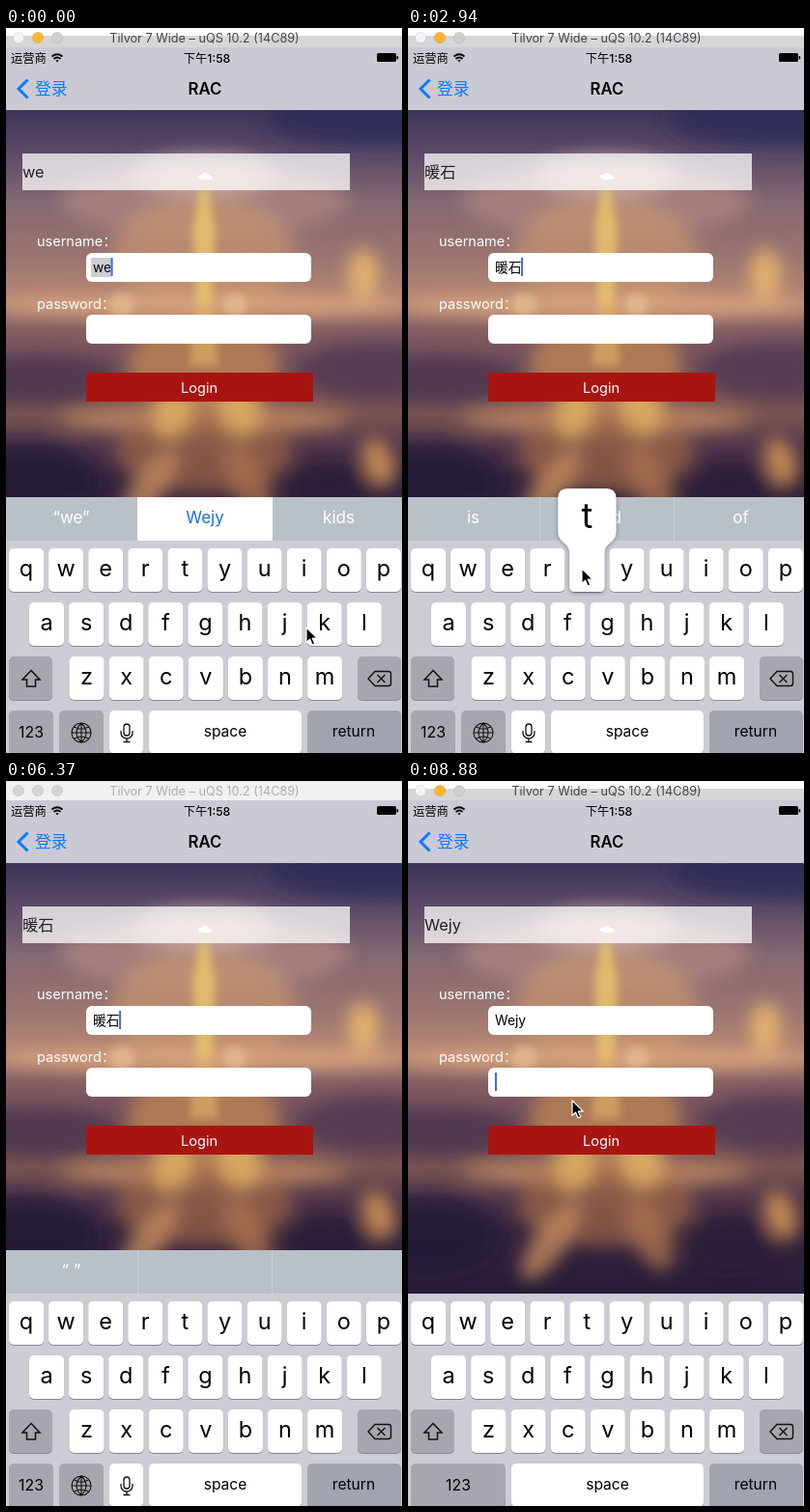
Animation of 410 by 751 pixels, one loop 9.03 s. Source, as an HTML page:

```html
<!DOCTYPE html>
<html lang="zh-CN">
<head>
<meta charset="utf-8">
<title>Login form</title>
<style>
  html, body { margin: 0; width: 100%; height: 100%; overflow: hidden; background: #cdccd5; }
  svg { display: block; width: 100%; height: 100%; }
  text { font-family: Inter, "Noto Sans CJK SC", "Noto Sans CJK", sans-serif; }
</style>
</head>
<body>
<svg id="stage" viewBox="0 0 410 751"></svg>
<script>
const LOOP = 9030, STEP_MS = 148.03, STEP_LEAD = 25, LAST_STEP = 60;
const FIELD_SIZE = 13.8;
const BLUE = '#087bff', GREY_KEY = '#a5a6ae';

// Step at which each value starts to hold.
const typed = [[0, 'we'], [2, 'wej'], [8, 'wejy'], [11, 'Wejy'], [19, '暖石'], [45, ''],
  [46, 'w'], [47, 'we'], [48, 'wej'], [49, 'wejy'], [54, 'Wejy']];
const suggestions = [
  [0, ['“we”', 'Wejy', 'kids', '#fff']],
  [2, ['“wej”', 'Wejy', 'kids', '#fff']],
  [8, ['“wejy”', 'Wejy', 'WejyTestRAC', '#e9ecee']],
  [11, ['is', 'and', 'of']],
  [21, ['', '', '']],
  [25, ['“ ”', '', '']],
  [46, ['“w”', 'we', 'with', '#e9ecee']],
  [47, ['“we”', 'Wejy', 'kids', '#e9ecee']],
  [49, ['“wejy”', 'Wejy', 'WejyTestRAC', '#e9ecee']],
  [54, ['is', 'and', 'of']]];
const pressed = [[0, ''], [1, 'j'], [2, ''], [7, 'y'], [8, ''], [18, 't'], [21, ''],
  [46, 'w'], [47, 'e'], [48, 'j'], [49, '']];
const marked = [[0, true], [11, false], [51, true], [54, false]];
const caretOn = [[0, true], [12, false], [15, true], [22, false], [25, true],
  [30, false], [34, true], [38, false], [41, true]];
const pointer = [[0, 311, 621], [2, 311, 621], [4, 398, 664], [7, 228, 562], [8, 226, 560],
  [9, 217, 527], [10, 208, 510], [11, 208, 510], [14, 190, 588], [17, 180, 560], [21, 180, 560],
  [24, 318, 622], [25, 329, 629], [26, 329, 629], [29, 202, 384], [31, 202, 384], [34, 347, 520],
  [37, 330, 700], [38, 330, 765], [43, 410, 765], [44, 387, 664], [45, 387, 664], [46, 64, 563],
  [47, 105, 562], [48, 287, 618], [49, 228, 562], [50, 228, 562], [53, 206, 508], [54, 206, 508],
  [58, 170, 316], [59, 170, 316], [60, 170, 331]];

const valueAt = (track, step) => track.findLast(([start]) => start <= step)[1];

function pointerAt(step) {
  const next = pointer.findIndex(([at]) => at >= step);
  const [b, bx, by] = pointer[next];
  if (b === step) return [bx, by];
  const [a, ax, ay] = pointer[next - 1];
  const u = (step - a) / (b - a), ease = u * u * (3 - 2 * u);
  return [ax + (bx - ax) * ease, ay + (by - ay) * ease];
}

const rect = (x, y, w, h, fill, r = 0) =>
  `<rect x="${x}" y="${y}" width="${w}" height="${h}" rx="${r}" fill="${fill}"/>`;
const label = (s, x, y, size, fill = '#000', anchor = 'start', weight = 400) =>
  `<text x="${x}" y="${y}" font-size="${size}" fill="${fill}" text-anchor="${anchor}" font-weight="${weight}">${s}</text>`;
const centered = (s, x, y, size, fill, weight) => label(s, x, y, size, fill, 'middle', weight);
const line = (d, stroke = '#111', width = 1.5, fill = 'none') =>
  `<path d="${d}" stroke="${stroke}" stroke-width="${width}" fill="${fill}"/>`;
const keyCap = (x, y, w, fill = '#fff') =>
  rect(x, y + 1, w, 45, '#88898f', 5) + rect(x, y, w, 45, fill, 5);

const keys = {};
[['qwertyuiop', 21, 539], ['asdfghjkl', 42, 595], ['zxcvbnm', 83.5, 651]].forEach(([row, x0, y]) =>
  [...row].forEach((char, i) => keys[char] = { x: x0 + i * 41.1, y }));

const gauge = document.createElement('canvas').getContext('2d');
function textWidth(s) {
  gauge.font = `${FIELD_SIZE}px Inter, "Noto Sans CJK SC", "Noto Sans CJK", sans-serif`;
  return gauge.measureText(s).width;
}

// Soft lights and shadows: x, y, rx, ry, colour, opacity, rotation
const blobs = [
  [390, 95, 120, 28, '#2c2a58', .8, 0], [205, 178, 150, 38, '#b98e86', .6, 0],
  [205, 152, 75, 22, '#d9b9ae', .65, 0], [205, 235, 95, 60, '#c8966f', .65, 0],
  [205, 288, 215, 11, '#e0ab80', .75, 0], [370, 255, 16, 26, '#e8b66d', .9, 0],
  [30, 365, 85, 26, '#4a3450', .8, 0], [385, 355, 80, 30, '#4f3853', .8, 0],
  [205, 350, 80, 48, '#c08855', .75, 0], [205, 405, 150, 14, '#c08862', .85, 0],
  [205, 440, 92, 42, '#9a6549', .75, 0],
  [172, 400, 20, 26, '#e6b766', .75, 20], [242, 395, 22, 28, '#e6b766', .75, -20],
  [20, 470, 75, 42, '#21183a', .8, 0], [335, 480, 45, 30, '#2b1e38', .7, 0],
  [148, 476, 17, 48, '#bd855c', .85, 35], [250, 468, 20, 42, '#a8714f', .8, -25],
  [386, 450, 16, 26, '#cd9158', .9, -20]];
const skyStops = [[85, '#3d3559'], [130, '#5b4a68'], [180, '#846872'], [235, '#9a7471'],
  [285, '#b88974'], [312, '#855f64'], [350, '#6c4c59'], [400, '#7a5652'],
  [435, '#50354a'], [465, '#35243c'], [531, '#281c37']];

function backdrop() {
  const stops = skyStops.map(([y, c]) => `<stop offset="${(y - 85) / 446}" stop-color="${c}"/>`).join('');
  const lights = blobs.map(([x, y, rx, ry, fill, opacity, turn]) =>
    `<ellipse cx="${x}" cy="${y}" rx="${rx}" ry="${ry}" fill="${fill}" opacity="${opacity}" transform="rotate(${turn} ${x} ${y})"/>`).join('');
  return `<defs>
      <linearGradient id="sky" x2="0" y2="1">${stops}</linearGradient>
      <filter id="soft" x="-50%" y="-50%" width="200%" height="200%"><feGaussianBlur stdDeviation="9"/></filter>
      <filter id="glow" x="-100%" y="-50%" width="300%" height="200%"><feGaussianBlur stdDeviation="4"/></filter>
      <filter id="shade" x="-30%" y="-30%" width="160%" height="160%"><feDropShadow dx="0" dy="1" stdDeviation="2.5" flood-opacity=".35"/></filter>
    </defs>
    ${rect(0, 85, 410, 446, 'url(#sky)')}
    <g filter="url(#soft)">${lights}</g>
    <g filter="url(#glow)">
      <path d="M201 165h8l8 45-4 78h-16l-4-78z" fill="#eac66d" opacity=".8"/>
      <path d="M196 290h18l6 60h-30z" fill="#e3b568" opacity=".6"/>
      <circle cx="120" cy="287" r="13" fill="#edc594" opacity=".6"/>
      <circle cx="237" cy="287" r="12" fill="#edc594" opacity=".6"/>
    </g>`;
}

function screen() {
  return rect(0, 20, 410, 65, '#cbcad4')
    + label('运营商', 5, 36, 12.3)
    + centered('下午1:58', 208, 36, 12.3, '#000', 500)
    + line('M47.5 29.5q5.5-4.5 11 0M49.5 32q3.5-3 7 0', '#000', 1.8)
    + '<path d="M51.5 33.5q1.5-1 3 0l-1.5 2z"/>'
    + rect(384, 26, 20, 9, '#000', 1.5) + rect(404.5, 29, 1.7, 3.5, '#000', .8)
    + line('M22.5 53.5 13 63l9.5 9.5', BLUE, 3)
    + label('登录', 30, 69, 16.8, BLUE) + centered('RAC', 206, 69, 16.8, '#000', 600)
    + `<g opacity=".75">${rect(17, 130, 339, 38, '#fff')}</g>`
    + '<path d="M198 155q2-4 5-3 3-4 6 0 4 0 5 4-8 3-16-1z" fill="#fff"/>'
    + label('username：', 32, 226, 14.5, '#fff') + label('password：', 32, 291, 14.5, '#fff')
    + rect(83, 233, 233, 30, '#fff', 6) + rect(83, 297, 233, 30, '#fff', 6)
    + rect(83, 357, 235, 30, '#a81511') + centered('Login', 200, 377.5, 14.6, '#fff');
}

function keyboard() {
  const letters = Object.entries(keys).map(([char, { x, y }]) =>
    keyCap(x - 18, y, 36) + centered(char, x, y + 28.7, 23.5)).join('');
  return rect(0, 531, 410, 220, '#cdccd5') + letters
    + keyCap(3, 651, 45, GREY_KEY) + line('M26 665.5 35 675h-4.5v7h-9v-7H17z')
    + keyCap(364, 651, 45, GREY_KEY)
    + line('M382 666.5h14q2.5 0 2.5 2.5v10q0 2.5-2.5 2.5h-14l-7-7.5zM384.5 670l8 8m0-8-8 8', '#111', 1.4)
    + keyCap(312, 707, 97, '#a1a4af') + centered('return', 360, 734, 15.6);
}

function titleBar(active) {
  const lights = active ? ['#f5f3f5', '#f9b52f', '#d0ced1'] : ['#d5d5d5', '#d5d5d5', '#d5d5d5'];
  return rect(0, 0, 410, 20, active ? '#d8d5d9' : '#f1f1f1')
    + (active ? rect(0, 0, 410, 8, '#fff') : '')
    + lights.map((fill, i) => `<circle cx="${13 + i * 20}" cy="10" r="5.7" fill="${fill}" stroke="#0002" stroke-width=".6"/>`).join('')
    + centered('Tilvor 7 Wide – uQS 10.2 (14C89)', 205.5, 15, 12.7, active ? '#454347' : '#adadad');
}

function suggestionBar([left, middle, right, highlight]) {
  return rect(0, 486, 410, 45, '#b9c0c8')
    + (highlight ? rect(136, 486, 140, 45, highlight)
      : rect(136, 486, 1, 45, '#c9cfd5') + rect(275, 486, 1, 45, '#c9cfd5'))
    + centered(left, 67.5, 513, 17, '#fff')
    + centered(middle, 206, 513, 17, highlight ? '#1a70db' : '#fff')
    + centered(right, 344.5, 513, 17, '#fff');
}

function bottomRow(secure) {
  if (secure) return keyCap(3, 707, 98, GREY_KEY) + centered('123', 52, 735, 15.8)
    + keyCap(107, 707, 199) + centered('space', 206.5, 734, 15.6);
  return keyCap(3, 707, 46, GREY_KEY) + centered('123', 26, 735, 15.8)
    + keyCap(55, 707, 46, GREY_KEY)
    + line('M68 730a10 10 0 0 1 20 0a10 10 0 0 1-20 0zM68 730h20M78 720v20M78 720q-10 10 0 20q10-10 0-20M70.5 724q7.5 4 15 0M70.5 736q7.5-4 15 0', '#111', 1.1)
    + keyCap(107, 707, 35)
    + line('M122 724a3 3 0 0 1 6 0v6a3 3 0 0 1-6 0zM119 728v2a6 6 0 0 0 12 0v-2M125 736v3.5M121.5 739.5h7', '#111', 1.3)
    + keyCap(148, 707, 158) + centered('space', 227, 734, 15.6);
}

function keyPopup(char) {
  if (!char) return '';
  const { x, y } = keys[char];
  return `<path filter="url(#shade)" fill="#fff" d="M${x - 30} ${y - 52}q0-10 10-10h40q10 0 10 10v34
    c0 14-12 10-12 24V${y + 40}q0 5-5 5h-26q-5 0-5-5V${y + 6}c0-14-12-10-12-24z"/>`
    + centered(char, x, y - 21, 36);
}

function arrow([x, y]) {
  return `<path transform="translate(${x} ${y})" d="M0 0v15.5l3.6-3.3 2.5 5.8 2.7-1.2-2.5-5.6h4.9z" stroke="#fff" stroke-width="1.2" stroke-linejoin="round"/>`;
}

function frame(step) {
  const text = valueAt(typed, step), secure = step >= 59;
  const end = 90 + textWidth(text);
  const [caretX, caretY] = secure ? [90, 302] : [end - .5, 238];
  return titleBar(step !== 43)
    + label(text, 17, 155, 16.3, '#222')
    + (valueAt(marked, step) ? rect(88, 238, end - 88, 20, '#cccdd5') : '')
    + label(text, 90, 252.5, FIELD_SIZE)
    + (valueAt(caretOn, step) ? rect(caretX, caretY, 2, 19, '#426bdc') : '')
    + (secure ? '' : suggestionBar(valueAt(suggestions, step)))
    + bottomRow(secure)
    + keyPopup(valueAt(pressed, step))
    + arrow(pointerAt(step));
}

const stage = document.getElementById('stage');
stage.innerHTML = backdrop() + screen() + keyboard() + '<g id="live"></g>';
const live = document.getElementById('live');
const start = performance.now();
let shown = -1;

function tick() {
  const time = (performance.now() - start) % LOOP;
  const step = Math.min(LAST_STEP, Math.floor((time + STEP_LEAD) / STEP_MS));
  if (step !== shown) live.innerHTML = frame(shown = step);
  requestAnimationFrame(tick);
}
tick();
</script>
</body>
</html>
```
